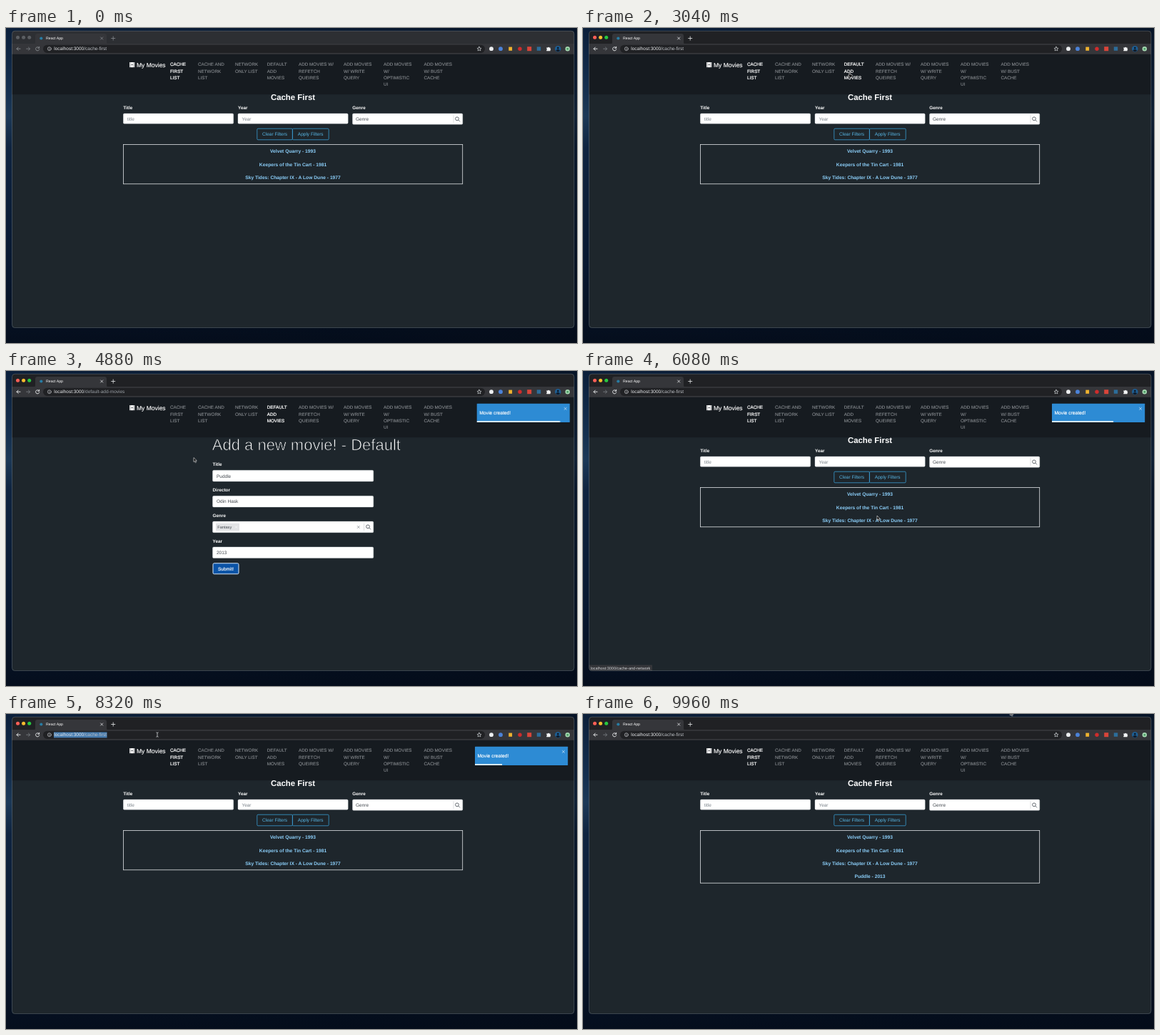
Recreate the animation shown at these times as an HTML page. Size 800 px wide and 442 px high, loop 10000 ms.

```html
<!DOCTYPE html>
<html lang="en">
<head>
<meta charset="utf-8">
<title>React App</title>
<style>
html, body { margin: 0; width: 100%; height: 100%; overflow: hidden; background: #06101f; }
svg { display: block; width: 100vw; height: 100vh; }
text { font: 6.5px "Liberation Sans", Arial, sans-serif; fill: #fff; text-rendering: geometricPrecision; white-space: pre; }
.step, .nav text { animation: 10s step-end infinite; }

/* browser chrome */
.tab { font-size: 5.2px; }
.url { font-size: 6.5px; fill: #e8eaed; }
.status text { font-size: 5.5px; fill: #d5d8db; }
.icon { fill: none; stroke: currentColor; stroke-width: .9; stroke-linecap: round; stroke-linejoin: round; }
.idle { animation-name: idle; color: #8b8f94; }
.focused { animation-name: focused; color: #f1f3f4; }
@keyframes idle { 0% { opacity: 1 } 29.6%, 100% { opacity: 0 } }
@keyframes focused { 0% { opacity: 0 } 29.6%, 100% { opacity: 1 } }

/* navigation */
.nav text { font-size: 6.3px; color: #8d9195; fill: currentColor; stroke: currentColor; stroke-width: .08; }
.nav .first { animation-name: linkFirst; }
.nav .network { animation-name: linkNetwork; }
.nav .add { animation-name: linkAdd; }
@keyframes linkFirst { 0% { color: #fff; stroke-width: .22 } 31.2% { color: #8d9195; stroke-width: .08 } 51.6%, 100% { color: #fff; stroke-width: .22 } }
@keyframes linkNetwork { 0% { color: #8d9195 } 54.4% { color: #fff } 55.8%, 100% { color: #8d9195 } }
@keyframes linkAdd { 0% { color: #8d9195; stroke-width: .08 } 27.6% { color: #fff; stroke-width: .22 } 53.2%, 100% { color: #8d9195; stroke-width: .08 } }
.brand { font-size: 8.5px; stroke: #fff; stroke-width: .15; }

/* pages */
.list { animation-name: listPage; }
.form { animation-name: formPage; }
@keyframes listPage { 0% { opacity: 1 } 31.2% { opacity: 0 } 53.2%, 100% { opacity: 1 } }
@keyframes formPage { 0% { opacity: 0 } 31.2% { opacity: 1 } 53.2%, 100% { opacity: 0 } }
.mid { text-anchor: middle; }
.h2 { font-size: 11.4px; font-weight: bold; }
.h1 { font-size: 22px; stroke: #1e262c; stroke-width: .75; }
.label { font-size: 6.4px; font-weight: bold; }
.field { fill: #fff; stroke: #ced4da; stroke-width: .4; }
.value { fill: #43494f; }
.hint { fill: #7b838a; }
.btn { fill: none; stroke: #3a9fd3; stroke-width: .8; }
.btn + text { fill: #58b7e6; }
.movies text { font-size: 6.7px; font-weight: bold; fill: #8ccffa; }
.frame { fill: none; stroke: #dfe3e6; stroke-width: .8; animation-name: grow; }
.added { animation-name: added; }
@keyframes grow { 0% { height: 55.4px } 89.2%, 100% { height: 73.8px } }
@keyframes added { 0% { opacity: 0 } 89.2%, 100% { opacity: 1 } }
.submit { fill: #0b53a6; stroke: #0b53a6; stroke-width: 1; animation-name: submit; }
@keyframes submit { 0% { stroke: #0b53a6 } 43%, 100% { stroke: #d6e8fb } }

/* toast */
.toastTime { animation-name: toastTime; }
.toast { animation: bounce 10s cubic-bezier(.215,.61,.355,1) infinite; }
.toast text { font-size: 6.7px; stroke: #fff; stroke-width: .15; }
.bar { transform-origin: 657px 71px; animation: drain 10s linear infinite; }
@keyframes toastTime { 0% { opacity: 0 } 43.48% { opacity: 1 } 89.2%, 100% { opacity: 0 } }
@keyframes bounce {
  0%, 43.48% { transform: translateX(1218px); opacity: 0 }
  47.68% { transform: translateX(-10px); opacity: 1 }
  48.73% { transform: translateX(4px) }
  49.78% { transform: translateX(-2px) }
  50.48%, 100% { transform: none; opacity: 1 }
}
@keyframes drain { 0%, 43.48% { transform: none } 60.8% { transform: scaleX(.66) } 83.2% { transform: scaleX(.292) } 100% { transform: scaleX(.01) } }

/* address and status bars */
.select { animation-name: select; }
@keyframes select { 0% { opacity: 0 } 81.6% { opacity: 1 } 88.4%, 100% { opacity: 0 } }
.statusAdd { animation-name: statusAdd; }
.statusFirst { animation-name: statusFirst; }
.statusNetwork { animation-name: statusNetwork; }
@keyframes statusAdd { 0% { opacity: 0 } 31.6% { opacity: 1 } 37.2%, 100% { opacity: 0 } }
@keyframes statusFirst { 0% { opacity: 0 } 52.8% { opacity: 1 } 54.8%, 100% { opacity: 0 } }
@keyframes statusNetwork { 0% { opacity: 0 } 54.8% { opacity: 1 } 63.2%, 100% { opacity: 0 } }

/* pointer */
.pointer { animation: travel 10s ease-in-out infinite; }
@keyframes travel {
  0%, 4% { transform: translate(-12px, 250px) }
  10.4% { transform: translate(215px, 190px) }
  17%, 21% { transform: translate(330px, 79px) }
  28%, 33% { transform: translate(373px, 62px) }
  40.5%, 44% { transform: translate(308px, 277px) }
  48.8% { transform: translate(263px, 121.5px) }
  51.8%, 53.4% { transform: translate(241px, 60px) }
  55% { transform: translate(286px, 64px) }
  59.5%, 73.5% { transform: translate(412px, 203px) }
  79.5%, 87.5% { transform: translate(212px, 29px) }
  93%, 95% { transform: translate(440px, 220px) }
  99.6%, 100% { transform: translate(598.5px, -4px) }
}
.arrow { animation-name: arrow; }
.hand { animation-name: hand; }
.beam { animation-name: beam; }
@keyframes arrow {
  0% { opacity: 1 } 27.6% { opacity: 0 } 34.4% { opacity: 1 } 40% { opacity: 0 } 44.8% { opacity: 1 }
  51.6% { opacity: 0 } 55.8% { opacity: 1 } 78.8% { opacity: 0 } 88% { opacity: 1 } 100% { opacity: 1 }
}
@keyframes hand {
  0% { opacity: 0 } 27.6% { opacity: 1 } 34.4% { opacity: 0 } 40% { opacity: 1 } 44.8% { opacity: 0 }
  51.6% { opacity: 1 } 55.8%, 100% { opacity: 0 }
}
@keyframes beam { 0% { opacity: 0 } 78.8% { opacity: 1 } 88%, 100% { opacity: 0 } }
</style>
</head>
<body>
<svg viewBox="0 0 800 442" preserveAspectRatio="none">
  <defs>
    <linearGradient id="sky" x2="0" y2="1">
      <stop offset="0" stop-color="#0b1f3a"/>
      <stop offset=".2" stop-color="#15304f"/>
      <stop offset=".28" stop-color="#1c3957"/>
      <stop offset=".38" stop-color="#0f2440"/>
      <stop offset=".75" stop-color="#081830"/>
      <stop offset="1" stop-color="#050e1d"/>
    </linearGradient>
    <linearGradient id="shade">
      <stop offset="0" stop-color="#030a16" stop-opacity="0"/>
      <stop offset="1" stop-color="#030a16" stop-opacity=".55"/>
    </linearGradient>
    <clipPath id="win"><rect x="8.5" y="4" width="787.5" height="416.7" rx="4"/></clipPath>
    <g id="lens" fill="none" stroke="#555c63" stroke-width=".9"><circle r="2.4"/><path d="M1.8 1.8L4 4"/></g>
    <g id="tools" class="icon">
      <path d="M20 29.2H15M17.2 27L15 29.2L17.2 31.4"/>
      <path d="M46.2 27.6A2.6 2.6 0 1 0 46.7 30M46.6 26.3V28.2H44.7"/>
      <path d="M132.6 12.9L135.8 16.1M135.8 12.9L132.6 16.1M147.6 14.5H152.8M150.2 11.9V17.1" stroke-width=".75"/>
    </g>
  </defs>

  <rect width="800" height="442" fill="url(#sky)"/>
  <rect width="800" height="442" fill="url(#shade)"/>

  <g clip-path="url(#win)">
    <rect x="8" y="4" width="789" height="417" fill="#1e262c"/>
    <rect x="8" y="4" width="789" height="19" fill="#202124"/>
    <rect class="step idle" x="8" y="4" width="789" height="19" fill="#2d2f33"/>
    <path d="M39 22.5Q41 22.5 41 20V11Q41 8 44 8H138Q141 8 141 11V20Q141 22.5 143 22.5Z" fill="#35363a"/>
    <rect x="8" y="22" width="789" height="15" fill="#35363a"/>
    <rect x="52" y="23.7" width="619" height="11.2" rx="5.6" fill="#202124"/>

    <g class="step idle" fill="#5b5e62"><circle cx="16.5" cy="13.2" r="2.5"/><circle cx="24.6" cy="13.2" r="2.5"/><circle cx="32.7" cy="13.2" r="2.5"/></g>
    <g class="step focused"><circle cx="16.5" cy="13.2" r="2.5" fill="#ff5f57"/><circle cx="24.6" cy="13.2" r="2.5" fill="#febc2e"/><circle cx="32.7" cy="13.2" r="2.5" fill="#28c840"/></g>
    <circle cx="49.3" cy="14.5" r="2.1" fill="#287ca3"/>
    <text class="tab" x="56" y="16.3">React App</text>
    <g class="step idle"><use href="#tools"/></g>
    <g class="step focused"><use href="#tools"/></g>
    <path class="icon" color="#777b80" d="M28.6 29.2H33.6M31.4 27L33.6 29.2L31.4 31.4"/>
    <g class="icon" color="#c4c7ca" stroke-width=".7"><circle cx="60.8" cy="29.2" r="2.5" stroke-width=".7"/><path d="M60.8 29V30.5M60.8 27.8V27.8" stroke-width=".7"/></g>

    <rect class="step select" x="67" y="25.4" width="74.5" height="8" fill="#467bae"/>
    <text class="url step list" x="67.3" y="31.4">localhost:3000<tspan fill="#bdc1c6">/cache-first</tspan></text>
    <text class="url step form" x="67.3" y="31.4">localhost:3000<tspan fill="#9aa0a6">/default-add-movies</tspan></text>

    <path class="icon" color="#d5d8db" stroke-width=".7" d="M663 26.2L663.9 28.2L666 28.4L664.4 29.8L664.9 31.9L663 30.8L661.1 31.9L661.6 29.8L660 28.4L662.1 28.2Z" style="stroke-width:.7"/>
    <circle cx="680" cy="29.2" r="2.9" fill="#eceef0"/>
    <circle cx="693" cy="29.2" r="2.9" fill="#4b82d8"/>
    <rect x="704.3" y="26.6" width="4.8" height="5.2" fill="#f0b32e"/>
    <circle cx="720" cy="29.2" r="2.7" fill="#cf2c2c"/>
    <rect x="730.2" y="26.2" width="6" height="6" fill="#d9453a"/>
    <rect x="743.8" y="26.4" width="5.4" height="5.4" fill="#2c6d9a"/>
    <path d="M757.3 27.4H759A1.2 1.2 0 0 1 761.2 27.4H762.6V29A1.2 1.2 0 0 1 762.6 31V32.2H757.3V30.8A1 1 0 0 0 757.3 28.9Z" fill="#f1f3f4"/>
    <circle cx="773.3" cy="29.2" r="4.2" fill="#1d5f95"/>
    <path d="M770.3 32.1Q770.8 29.9 773.3 29.9T776.3 32.1Q773.3 34.4 770.3 32.1Z" fill="#101c2a"/>
    <circle cx="773.3" cy="28.1" r="1.5" fill="#101c2a"/>
    <circle cx="786.8" cy="29.2" r="3.2" fill="#a6d9b2"/><circle cx="786.8" cy="29.2" r="1.5" fill="#4d9c66"/>

    <rect x="8" y="36.8" width="789" height="56.4" fill="#161b20"/>
    <path d="M173 48H180.3V55.2H173Z" fill="#fff"/>
    <path d="M174.2 48.4V55M179.1 48.4V55" stroke="#161b20" stroke-width=".8" stroke-dasharray="1 .9"/>
    <path d="M175.3 51.6H178" stroke="#161b20" stroke-width=".7"/>
    <text class="brand" x="183" y="54.6">My Movies</text>
    <g class="nav">
      <text class="first" y="53.3"><tspan x="230">CACHE</tspan><tspan x="230" dy="9.25">FIRST</tspan><tspan x="230" dy="9.25">LIST</tspan></text>
      <text class="network" y="53.3"><tspan x="269">CACHE AND</tspan><tspan x="269" dy="9.25">NETWORK</tspan><tspan x="269" dy="9.25">LIST</tspan></text>
      <text y="53.3"><tspan x="321">NETWORK</tspan><tspan x="321" dy="9.25">ONLY LIST</tspan></text>
      <text class="add" y="53.3"><tspan x="365.7">DEFAULT</tspan><tspan x="365.7" dy="9.25">ADD</tspan><tspan x="365.7" dy="9.25">MOVIES</tspan></text>
      <text y="53.3"><tspan x="410">ADD MOVIES W/</tspan><tspan x="410" dy="9.25">REFETCH</tspan><tspan x="410" dy="9.25">QUEIRES</tspan></text>
      <text y="53.3"><tspan x="473">ADD MOVIES</tspan><tspan x="473" dy="9.25">W/ WRITE</tspan><tspan x="473" dy="9.25">QUERY</tspan></text>
      <text y="53.3"><tspan x="529">ADD MOVIES</tspan><tspan x="529" dy="9.25">W/</tspan><tspan x="529" dy="9.25">OPTIMISTIC</tspan><tspan x="529" dy="9.25">UI</tspan></text>
      <text y="53.3"><tspan x="585.5">ADD MOVIES</tspan><tspan x="585.5" dy="9.25">W/ BUST</tspan><tspan x="585.5" dy="9.25">CACHE</tspan></text>
    </g>

    <g class="step list">
      <text class="h2 mid" x="402" y="101.2">Cache First</text>
      <text class="label" x="164.3" y="113.8">Title</text>
      <text class="label" x="325" y="113.8">Year</text>
      <text class="label" x="485.3" y="113.8">Genre</text>
      <rect class="field" x="164.3" y="120" width="154.4" height="14.2" rx="1.5"/>
      <rect class="field" x="325" y="120" width="154.2" height="14.2" rx="1.5"/>
      <rect class="field" x="485.5" y="120" width="154.3" height="15.2" rx="1.5"/>
      <text class="hint" x="169.7" y="129.6">title</text>
      <text class="hint" x="330.4" y="129.6">Year</text>
      <text class="value" x="490" y="130">Genre</text>
      <path d="M627 122.5V132.8" stroke="#c6cacd" stroke-width=".6"/>
      <use href="#lens" x="632" y="127.3"/>
      <rect class="btn" x="351.8" y="141.2" width="49.6" height="15.6" rx="1.3"/>
      <text class="mid" x="376.6" y="151.3">Clear Filters</text>
      <rect class="btn" x="401.4" y="141.2" width="50.8" height="15.6" rx="1.3"/>
      <text class="mid" x="426.7" y="151.3">Apply Filters</text>
      <rect class="step frame" x="164.4" y="163.4" width="475.3" height="55.4"/>
      <g class="movies mid">
        <text x="402" y="175.3">Velvet Quarry - 1993</text>
        <text x="402" y="193.6">Keepers of the Tin Cart - 1981</text>
        <text x="402" y="211.9">Sky Tides: Chapter IX - A Low Dune - 1977</text>
        <text class="step added" x="402" y="230.2">Puddle - 2013</text>
      </g>
    </g>

    <g class="step form">
      <text class="h1" x="288.8" y="111.4">Add a new movie! - Default</text>
      <text class="label" x="289.5" y="133.3">Title</text>
      <text class="label" x="289.5" y="169.2">Director</text>
      <text class="label" x="289.5" y="205.1">Genre</text>
      <text class="label" x="289.5" y="241">Year</text>
      <rect class="field" x="289.5" y="139.3" width="225.3" height="15.6" rx="1.5"/>
      <rect class="field" x="289.5" y="175.3" width="225.3" height="15.6" rx="1.5"/>
      <rect class="field" x="289.5" y="211.1" width="225.3" height="15.6" rx="1.5"/>
      <rect class="field" x="289.5" y="247" width="225.3" height="15.6" rx="1.5"/>
      <text class="value" x="295" y="149.5">Puddle</text>
      <text class="value" x="295" y="185.4">Odin Hask</text>
      <rect x="294" y="213.8" width="33" height="10.4" rx=".8" fill="#e2e3e5"/>
      <text class="value" x="296.3" y="221" style="font-size:5.6px">Fantasy</text>
      <path d="M321.3 217.8L323.7 220.2M323.7 217.8L321.3 220.2" stroke="#f6f6f6" stroke-width=".8"/>
      <path d="M492 217.2L495.6 220.8M495.6 217.2L492 220.8" stroke="#8d9398" stroke-width=".8"/>
      <path d="M501.6 214V224" stroke="#c6cacd" stroke-width=".6"/>
      <use href="#lens" x="507" y="218.3"/>
      <text class="value" x="295" y="257.2">2013</text>
      <rect class="step submit" x="290" y="269.8" width="36" height="15" rx="1.6"/>
      <text class="mid" x="308" y="279.6" stroke="#fff" stroke-width=".15">Submit!</text>
    </g>

    <g class="step toastTime">
      <g class="toast">
        <rect x="657" y="45.8" width="130.2" height="26.2" rx=".5" fill="#2d8bd4"/>
        <text x="660.5" y="61.2">Movie created!</text>
        <path d="M779.2 51L782.8 54.6M782.8 51L779.2 54.6" stroke="#d8eaf8" stroke-width=".7"/>
        <rect class="bar" x="657" y="70" width="130.2" height="2" fill="#d5e8f6"/>
      </g>
    </g>

    <g class="status">
      <g class="step statusAdd"><path d="M8 412.5H97V421H8Z" fill="#35363a"/><text x="10.5" y="418.6">localhost:3000/default-add-movies</text></g>
      <g class="step statusFirst"><path d="M8 412.5H76V421H8Z" fill="#35363a"/><text x="10.5" y="418.6">localhost:3000/cache-first</text></g>
      <g class="step statusNetwork"><path d="M8 412.5H97V421H8Z" fill="#35363a"/><text x="10.5" y="418.6">localhost:3000/cache-and-network</text></g>
    </g>
  </g>
  <rect x="8.5" y="4.2" width="787.4" height="416.4" rx="4" fill="none" stroke="#7b8890" stroke-opacity=".6" stroke-width=".7"/>

  <g class="pointer">
    <path class="step arrow" d="M0 0V6L1.4 4.8L2.4 7L3.4 6.5L2.5 4.4H4.3Z" fill="#000" stroke="#fff" stroke-width=".6"/>
    <path class="step hand" d="M-.2 .6Q.5 -.3 1.2 .6V3L3.9 3.6Q4.4 3.8 4.3 4.6L3.7 7.2H.4L-1.5 4.6Q-1.3 3.7 -.2 4.4Z" fill="#111" stroke="#fff" stroke-width=".6"/>
    <path class="step beam" d="M-1.6 -3.2Q0 -3.2 0 -2.2Q0 -3.2 1.6 -3.2M0 -2.2V2.2M-1.6 3.2Q0 3.2 0 2.2Q0 3.2 1.6 3.2" fill="none" stroke="#e6e8ea" stroke-width=".7"/>
  </g>
</svg>
</body>
</html>
```
